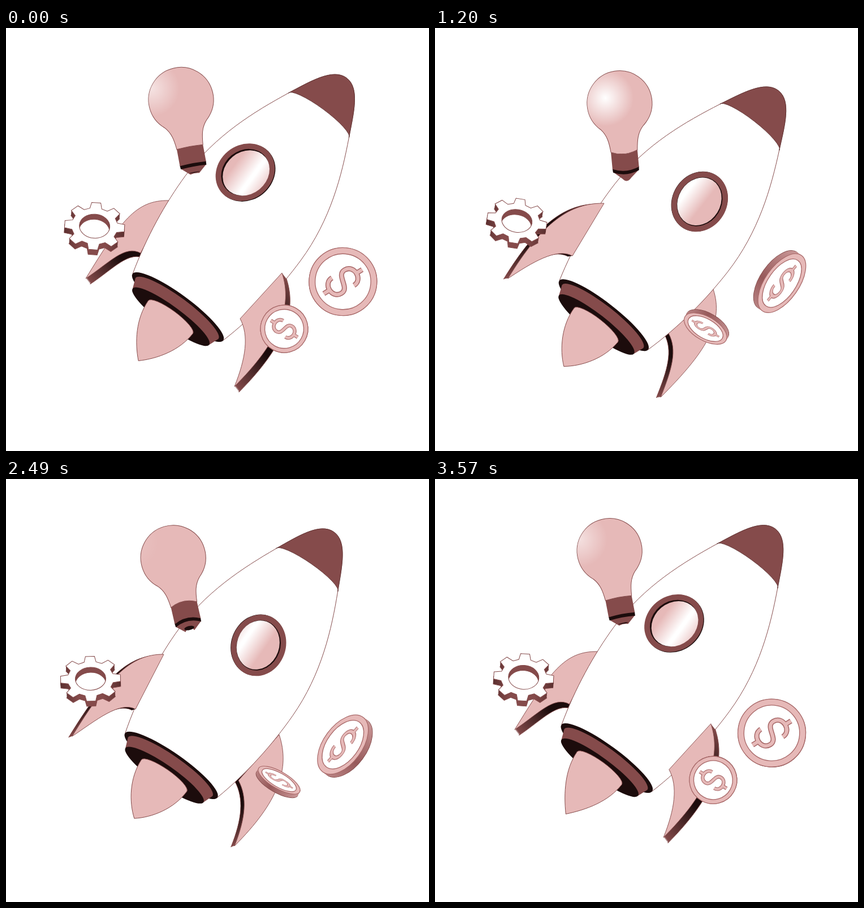
Write an HTML page with a canvas that moves like this. It is 748 px wide and 748 px high and loops after 3.6 s.

```html
<!DOCTYPE html>
<html lang="en">
<head>
<meta charset="utf-8">
<title>Rocket launch</title>
<style>
html, body { margin: 0; width: 100%; height: 100%; overflow: hidden; background: #fff; }
canvas { display: block; }
</style>
</head>
<body>
<canvas id="stage" width="748" height="748"></canvas>
<script>
const ctx = document.getElementById('stage').getContext('2d');
const LOOP = 3600, STEP = 30, RAD = Math.PI / 180;
const PINK = '#e6b9b8', BROWN = '#854b4b', DARK = '#1c0c0c', RIM = '#a86868';

let time = 0;
// First-harmonic motion: centre + amplitude, peaking at the given phase in degrees
const wave = (mid, amp, peak) => mid + amp * Math.cos(time / LOOP * 2 * Math.PI - peak * RAD);

// Smooth periodic curve through six poses
const KEYS = [0, 720, 1200, 1710, 2490, 3120];
const keyTime = i => KEYS[(i + 6) % 6] + LOOP * Math.floor(i / 6);
function track(values) {
  const v = i => values[(i + 6) % 6];
  const slope = i => (v(i + 1) - v(i - 1)) / (keyTime(i + 1) - keyTime(i - 1));
  let i = 5;
  while (KEYS[i] > time) i--;
  const span = keyTime(i + 1) - keyTime(i), s = (time - KEYS[i]) / span, r = 1 - s;
  return r * r * (1 + 2 * s) * v(i) + s * s * (3 - 2 * s) * v(i + 1)
    + span * s * r * (r * slope(i) - s * slope(i + 1));
}

function group(x, y, degrees, draw) {
  ctx.save();
  ctx.translate(x, y);
  ctx.rotate(degrees * RAD);
  draw();
  ctx.restore();
}

function paint(path, fill, stroke, width = 1) {
  if (fill) { ctx.fillStyle = fill; ctx.fill(path, 'evenodd'); }
  if (stroke) { ctx.strokeStyle = stroke; ctx.lineWidth = width; ctx.stroke(path); }
}

function oval(x, y, rx, ry, angle = 0) {
  const p = new Path2D();
  p.ellipse(x, y, rx, ry, angle, 0, 2 * Math.PI);
  return p;
}

function gradient(x0, y0, x1, y1, stops) {
  const g = ctx.createLinearGradient(x0, y0, x1, y1);
  stops.forEach(([at, color]) => g.addColorStop(at, color));
  return g;
}

// Fills the volume swept between the face and its shifted back
function extrude(path, dx, dy, side) {
  const n = 12;
  for (let i = n; i > 0; i--) {
    ctx.save();
    ctx.translate(dx * i / n, dy * i / n);
    paint(path, side, i === n && BROWN);
    ctx.restore();
  }
}

function fin(tip, top, root, bend) {
  const [tx, ty, ax, ay, rx, ry] = [...tip, ...top, ...root].map(track);
  const [a, b, c, d, e, f, g, h] = bend;
  const p = new Path2D();
  p.moveTo(ax, ay);
  p.bezierCurveTo(ax + a, ay + b, tx + c, ty + d, tx, ty);
  p.bezierCurveTo(tx + e, ty + f, rx + g, ry + h, rx, ry);
  p.closePath();
  const side = gradient(tx, ty, ax, ay, [[0, BROWN], [.35, DARK], [.6, DARK], [1, BROWN]]);
  extrude(p, wave(-2.5, 10.3, 0), wave(4, 6, 0), side);
  paint(p, PINK, BROWN, .9);
}

const leftFin = () => fin(
  [[141, 133, 129, 131, 117, 130], [443, 436, 443, 458, 455, 447]],
  [[288, 299, 299, 295, 279, 281], [305, 301, 310, 320, 310, 305]],
  [[238, 243, 243, 240, 229, 231], [398, 395, 403, 414, 407, 401]],
  [-59, -1, 62, -101, 42, -28, -28, -15]);

const rightFin = () => fin(
  [[404, 408, 399, 391, 404, 408], [634, 650, 653, 650, 649, 640]],
  [[488, 497, 492, 480, 483, 487], [433, 451, 462, 468, 452, 437]],
  [[414, 420, 413, 404, 411, 414], [514, 530, 540, 545, 533, 518]],
  [20, 60, 78, -78, 20, -50, 16, 30]);

const HULL = new Path2D(`M-99.3 0C-118 -65 -127 -135 -127 -195C-127 -285 -95 -360 -67 -420.5
  C-48 -460 -30 -503 0 -503C30 -503 47 -460 66 -420.5C95 -360 126 -285 126 -195C126 -135 118 -65 99.3 0Z`);
const NOSE = new Path2D('M-67 -420.5C-48 -460 -30 -503 0 -503C30 -503 47 -460 66 -420.5A66.5 13.5 0 0 0 -67 -420.5Z');
const BAND = new Path2D('M-91 3A91 20 0 0 1 91 3L84 21H-84Z');

function porthole() {
  const shift = wave(0, 3, 10), shine = wave(-15, 30, 0);
  group(wave(-8, 37.5, 180), -262.5, 0, () => {
    const turn = wave(-3, 18.5, 20) * RAD;
    paint(oval(shift * .5, 0, 48, 55, turn), DARK);
    paint(oval(0, 0, 48, 55, turn), BROWN);
    paint(oval(0, 0, 38.5, 45, turn), DARK);
    paint(oval(shift * .7, 0, 37.3, 44, turn), gradient(shine - 38, 0, shine + 38, 0,
      [[0, PINK], [.47, '#fff'], [.53, '#fff'], [1, PINK]]));
  });
}

function flame() {
  const tip = 118.5 + 4.5 * Math.cos(25 * time / LOOP * 2 * Math.PI + 97 * RAD);
  paint(new Path2D(`M-49 22A49 12 0 0 1 49 22C48 60 25 95 0 ${tip}C-25 95 -48 60 -49 22Z`), PINK, BROWN, .9);
}

function rocket() {
  const rolledRight = wave(-8, 37.5, 180) > -5;
  if (!rolledRight) leftFin(); else rightFin();
  group(wave(298, 7.2, 33), wave(503, 9.5, 180), 36.4 + wave(0, 1.68, 92), () => {
    paint(HULL, '#fff', BROWN, .9);
    paint(NOSE, BROWN, '#5c3030', .8);
    porthole();
    paint(oval(0, 0, 99.5, 22), DARK);
    paint(BAND, BROWN);
    paint(oval(0, 21, 84, 18), DARK);
    flame();
  });
  if (rolledRight) leftFin(); else rightFin();
}

function bulb() {
  group(wave(311, 17, 95), wave(133.3, 7.5, 212), -wave(9.5, 4.2, 285), () => {
    const bow = wave(-.5, 6, 95) * 2;
    const glass = new Path2D();
    glass.arc(0, 0, 57.5, 131.5 * RAD, 48.5 * RAD);
    glass.bezierCurveTo(27, 55, 25, 68, 23.5, 85);
    glass.quadraticCurveTo(0, 85 + bow, -23.5, 85);
    glass.bezierCurveTo(-25, 68, -27, 55, -38, 43);
    paint(glass, PINK, BROWN);

    const x = wave(-46, 24, 95), y = wave(-28, 18, 95);
    const glow = ctx.createRadialGradient(x, y, 0, x, y, 50);
    const alpha = Math.min(1, wave(.65, .55, 95));
    glow.addColorStop(0, `rgba(255,255,255,${alpha})`);
    glow.addColorStop(1, 'rgba(255,255,255,0)');
    paint(glass, glow);

    // Screw base: slices between two bowed edges
    const slice = (y0, w0, y1, w1, color) => paint(new Path2D(
      `M${-w0} ${y0}Q0 ${y0 + bow} ${w0} ${y0}L${w1} ${y1}Q0 ${y1 + bow} ${-w1} ${y1}Z`), color);
    slice(120, 23, 133, 8, BROWN);
    slice(114, 23.5, 121, 23, DARK);
    slice(85, 23.5, 115, 23.5, BROWN);
    if (bow < 0) paint(oval(0, 131 + bow * .3, 9, -bow * .3), DARK);
  });
}

function gear() {
  const tilt = wave(4, 6, 90), squash = wave(40.5, 1.5, 0) / 53.5;
  const p = new Path2D();
  for (let i = 0; i < 8; i++) {
    [[41, -.26], [53.5, -.15], [53.5, .15], [41, .26]].forEach(([r, da], k) => {
      const a = i * Math.PI / 4 + da;
      p[i + k ? 'lineTo' : 'moveTo'](r * Math.cos(a), r * Math.sin(a) * squash);
    });
  }
  p.closePath();
  p.addPath(oval(0, 0, 27, 27 * squash));
  group(wave(150, 7, 343), wave(348, 7, 290), tilt, () => {
    extrude(p, 0, 9, gradient(-53, 0, 53, 0, [[0, '#5c3030'], [.3, BROWN], [.7, BROWN], [1, '#5c3030']]));
    paint(p, '#fff', BROWN);
  });
}

const DOLLAR = new Path2D(`M16 -13C16 -33 -16 -33 -16 -13C-16 5 16 -5 16 13C16 33 -16 33 -16 13
  M0 -28V-40M0 28V40`);

function coin(x, y, radius, axis, spin, depth, signTurn) {
  const face = Math.cos(spin), rise = depth * Math.sin(spin) * Math.sign(face);
  const squash = Math.max(.02, Math.abs(face));
  group(x, y, axis, () => {
    ctx.translate(0, -rise / 2);
    const disc = oval(0, 0, radius, radius * squash);
    extrude(disc, 0, rise, gradient(-radius, 0, radius, 0, [[0, '#b98282'], [.4, '#96595a'], [1, '#c99696']]));
    paint(disc, PINK, RIM, 1.2);
    paint(oval(0, 0, radius * .82, radius * .82 * squash), '#fff', RIM, 1.3);
    ctx.scale(radius / 60, radius / 60 * squash);
    ctx.rotate((90 + signTurn) * RAD);
    paint(DOLLAR, null, RIM, 9);
    paint(DOLLAR, null, PINK, 6);
  });
}

function draw(now) {
  time = Math.floor(now % LOOP / STEP) * STEP;
  const turn = time / LOOP * 2 * Math.PI;
  ctx.fillStyle = '#fff';
  ctx.fillRect(0, 0, 748, 748);
  rocket();
  bulb();
  gear();
  coin(wave(602, 8, 140), wave(456.5, 16, 240), 60, -wave(50, 10, 180), turn / 2, -11, 8);
  coin(wave(484, 8, 0), wave(532, 4, 270), 42, 30, turn, 8, 2);
}

const start = performance.now();
function frame() {
  draw(performance.now() - start);
  requestAnimationFrame(frame);
}
frame();
</script>
</body>
</html>
```
